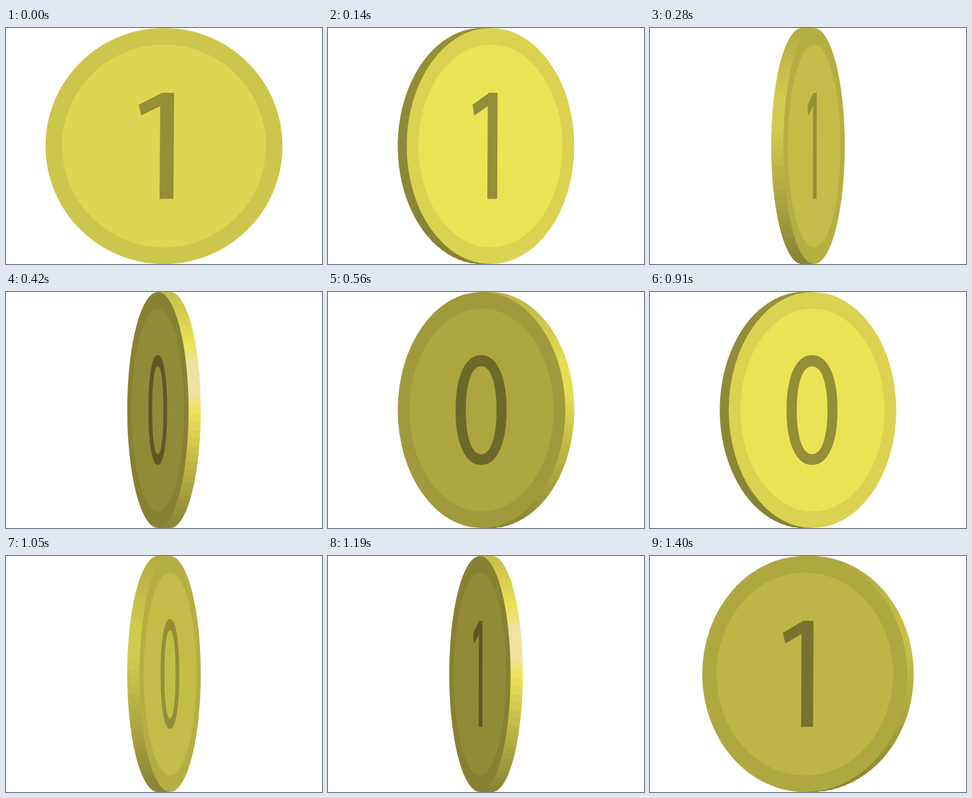
An HTML page with a canvas for the animation above (1470 ms loop, 500 by 375 pixels).

```html
<!DOCTYPE html>
<html lang="en">
<head>
<meta charset="utf-8">
<title>Spinning coin</title>
<style>
  html, body { margin: 0; width: 100%; height: 100%; overflow: hidden; background: #fff; }
  canvas { display: block; }
</style>
</head>
<body>
<canvas id="stage" width="500" height="375"></canvas>
<script>
const ctx = document.getElementById('stage').getContext('2d');
const CX = 250, CY = 187.5;
const RADIUS = 187.5, INNER = 161.3, HALF_DEPTH = 10;
const STEP_MS = 70, STEPS = 21, FACETS = 45;
const FULL_TONE = 236;

const ONE = [[-40, -65.5], [-3, -84.5], [16, -84.5], [15, 84], [-7, 84], [-6, -63.5], [-36, -48.5]];

// Gold of a given brightness; anything beyond the full tone turns pale.
function gold(light) {
  const base = Math.min(light, FULL_TONE);
  const pale = light - base;
  return `rgb(${Math.round(base)},${Math.round(base * 0.963)},${Math.round(base * 0.35 + 4 + pale * 5)})`;
}

// Headings are in radians: 0 faces the viewer, positive turns right.
function faceLight(heading) {
  const { sin, cos } = Math;
  return 137 + 94.6 * cos(heading) + 16 * sin(heading)
    - 9.7 * cos(2 * heading) + 20 * sin(2 * heading);
}

// Edge light: a glow right of centre and above the middle; v runs from -1 (top) to 1.
function edgeLight(heading, v) {
  const glow = Math.max(0, Math.cos(1.5 * (heading - Math.PI / 9)));
  const spread = Math.min(1, 1.12 - 0.9 * Math.abs(v + 0.25));
  return 142 - 7 * v + 108 * glow * spread;
}

function polygon(points) {
  points.forEach(([x, y], i) => i ? ctx.lineTo(x, y) : ctx.moveTo(x, y));
  ctx.closePath();
}

function roundedOval(x, y, a, b) {
  const bend = u => Math.sign(u) * Math.abs(u) ** 0.9;
  polygon(Array.from({ length: 120 }, (_, i) => {
    const t = i * Math.PI / 60;
    return [x + a * bend(Math.cos(t)), y + b * bend(Math.sin(t))];
  }));
}

function disc(radius, color) {
  ctx.fillStyle = color;
  ctx.beginPath();
  ctx.arc(0, 0, radius, 0, Math.PI * 2);
  ctx.fill();
}

function drawEdge(heading, shift, halfWidth) {
  const side = heading < 0 ? -1 : 1;
  const near = CX + shift, far = CX - shift;
  const rimPoint = t => [far + side * halfWidth * Math.cos(t), CY + RADIUS * Math.sin(t)];
  for (let i = 0; i < FACETS; i++) {
    const t0 = (i / FACETS - 0.5) * Math.PI;
    const t1 = t0 + Math.PI / FACETS;
    const [x0, y0] = rimPoint(t0), [x1, y1] = rimPoint(t1);
    // The small overlap hides seams between facets.
    const overlap = i < FACETS - 1 ? 0.6 : 0;
    ctx.fillStyle = gold(edgeLight(heading, Math.sin((t0 + t1) / 2)));
    ctx.beginPath();
    polygon([[near, y0], [x0, y0], [x1, y1], [x1, y1 + overlap], [near, y1 + overlap]]);
    ctx.fill();
  }
}

function drawFace(heading, shift, scale, isFront) {
  const light = faceLight(heading);
  ctx.save();
  ctx.translate(CX + shift, CY);
  ctx.scale(scale, 1);
  disc(RADIUS, gold(light * 0.925));
  disc(INNER, gold(light));
  // On the lit side the digit keeps one tone.
  ctx.fillStyle = gold(heading < 0 ? light * 0.63 : 147);
  ctx.beginPath();
  if (isFront) {
    polygon(ONE);
  } else {
    roundedOval(-1, 0, 57, 87.2);
    roundedOval(-0.8, 0.4, 34.3, 69.8);
  }
  ctx.fill('evenodd');
  ctx.restore();
}

function drawCoin(angle) {
  const isFront = angle <= 90 || angle >= 270;
  const degrees = isFront ? (angle > 180 ? angle - 360 : angle) : angle - 180;
  const heading = degrees * Math.PI / 180;
  const shift = HALF_DEPTH * Math.sin(heading);
  const scale = Math.cos(heading);

  ctx.fillStyle = '#fff';
  ctx.fillRect(0, 0, 500, 375);
  if (heading) drawEdge(heading - Math.sign(heading) * Math.PI / 2, shift, RADIUS * scale);
  if (scale > 0.01) drawFace(heading, shift, scale, isFront);
}

// The turn goes by 15 degrees, with a double step around each flat pose.
function angleAt(step) {
  if (step === 0) return 0;
  return 15 * (step + (step <= 10 ? 1 : 2));
}

function render() {
  drawCoin(angleAt(Math.floor(performance.now() / STEP_MS) % STEPS));
  requestAnimationFrame(render);
}
render();
</script>
</body>
</html>
```
